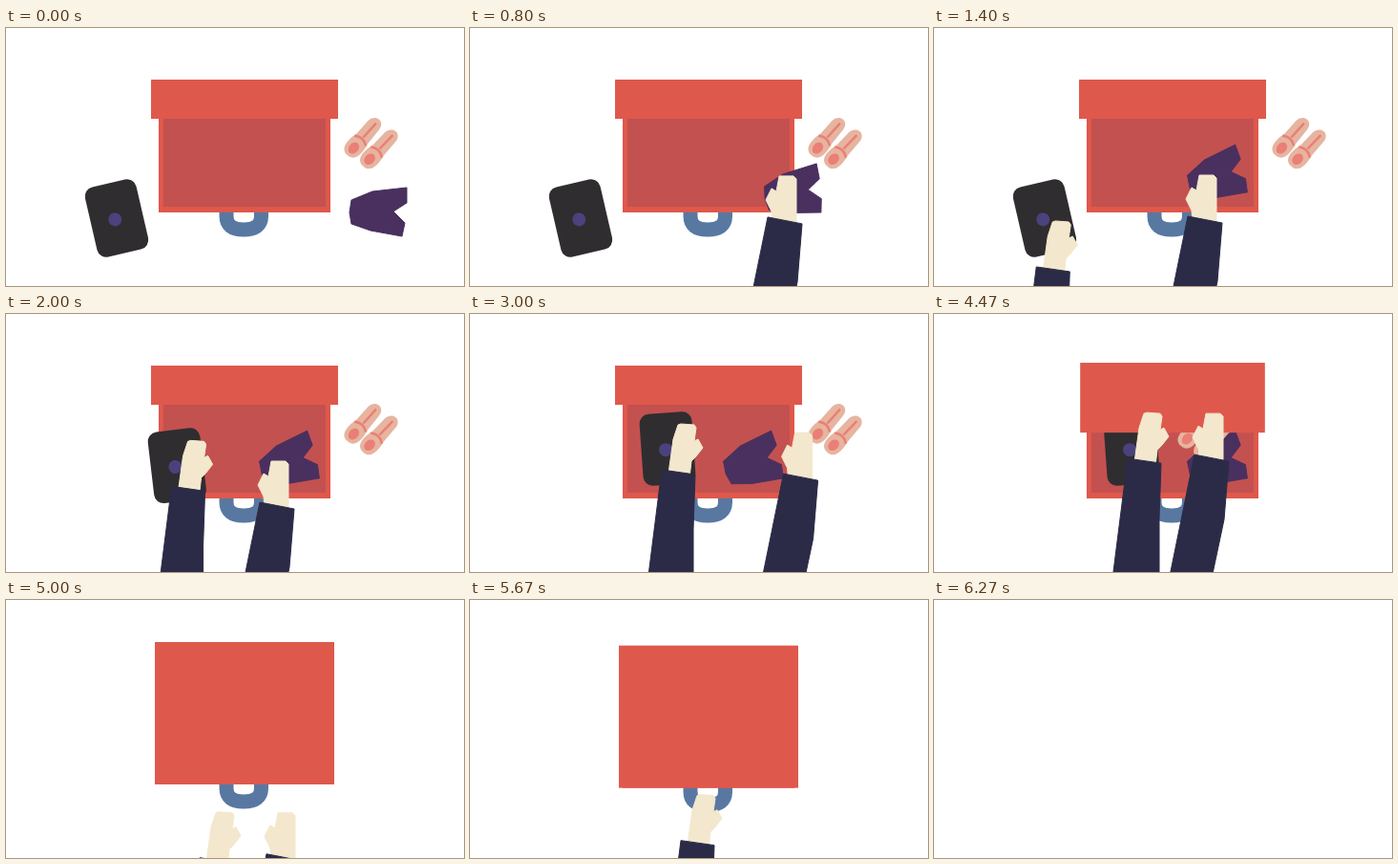
These frames come from a looping animation (480x270 px, 6.54 s). An HTML page with a canvas:

```html
<!DOCTYPE html>
<html lang="en">
<head>
<meta charset="utf-8">
<title>Packing a case</title>
<style>
html, body { margin: 0; width: 100%; height: 100%; overflow: hidden; background: #fff; }
canvas { display: block; }
</style>
</head>
<body>
<canvas id="stage" width="480" height="270"></canvas>
<script>
const ctx = document.getElementById('stage').getContext('2d');
const LOOP = 6540, STEP = 200 / 3;
const RED = '#df584c', SKIN = '#f3e8cd', NAVY = '#2b2b47', PINK = '#e97f76';

// Each key is [time, x, y].
const leftKeys = [
  [1150, 120, 300], [1530, 136, 172], [1600, 136, 172], [2256, 226, 115],
  [3800, 226, 115], [4200, 228, 74], [4216, 228, 74], [4866, 228, 172],
  [5170, 228, 300], [5250, 246, 300], [5560, 246, 200]
];
const rightKeys = [
  [130, 400, 300], [460, 386, 155], [485, 386, 155], [1085, 284, 153],
  [2783, 284, 153], [3133, 372, 111], [3140, 372, 111], [3700, 273, 116],
  [3800, 273, 116], [4200, 291, 74], [4216, 291, 74], [4866, 291, 172],
  [5170, 291, 300]
];

const leftHand = [[-8, 1], [-5, 0], [9, 1], [11, 4], [9, 18], [13, 16], [18, 25], [11, 34], [6, 39], [4, 56], [-18, 52], [-13, 16]];
const leftSleeve = [[-25, 48], [10, 53], [8, 110], [8, 230], [-48, 230]];
const rightHand = [[-6, 1], [9, 1], [12, 4], [12, 54], [-13, 50], [-14, 38], [-20, 26], [-14, 14], [-9, 17]];
const rightSleeve = [[-18, 44], [18, 51], [13, 112], [-12, 230], [-56, 230]];
const garment = [[-28, -12], [-6, -21], [30, -25], [30, -9], [16, 0], [28, 12], [25, 26], [-8, 20], [-28, 13], [-30, 1]];

const mix = (a, b, p) => a + (b - a) * p;

function ease(t, start, end) {
  const p = Math.min(1, Math.max(0, (t - start) / (end - start)));
  return p < 0.5 ? 2 * p * p : 1 - 2 * (1 - p) ** 2;
}

function track(keys, t) {
  let i = 0;
  while (i < keys.length - 2 && t > keys[i + 1][0]) i++;
  const [a, b] = [keys[i], keys[i + 1]];
  const p = ease(t, a[0], b[0]);
  return [mix(a[1], b[1], p), mix(a[2], b[2], p)];
}

function at(x, y, degrees, draw) {
  ctx.save();
  ctx.translate(x, y);
  ctx.rotate(degrees * Math.PI / 180);
  draw();
  ctx.restore();
}

function box(color, x1, y1, x2, y2) {
  ctx.fillStyle = color;
  ctx.fillRect(x1, y1, x2 - x1, y2 - y1);
}

function shape(points, color) {
  ctx.beginPath();
  points.forEach(([x, y]) => ctx.lineTo(x, y));
  ctx.closePath();
  ctx.fillStyle = ctx.strokeStyle = color;
  ctx.lineWidth = 1;
  ctx.lineJoin = 'round';
  ctx.fill();
  ctx.stroke();
}

function oval(color, x, y, rx, ry) {
  ctx.fillStyle = color;
  ctx.beginPath();
  ctx.ellipse(x, y, rx, ry, 0, 0, 7);
  ctx.fill();
}

function line(path, color, width) {
  ctx.strokeStyle = color;
  ctx.lineWidth = width;
  ctx.stroke(new Path2D(path));
}

function arm([x, y], hand, sleeve) {
  at(x, y, 0, () => {
    shape(hand, SKIN);
    shape(sleeve, NAVY);
  });
}

function tablet() {
  ctx.fillStyle = '#2f2d30';
  ctx.beginPath();
  ctx.roundRect(-27.5, -37.5, 55, 75, 10);
  ctx.fill();
  oval('#4b427d', -2, 1, 7, 7);
}

function sandal() {
  ctx.fillStyle = '#e6b49f';
  ctx.fill(new Path2D('M-25 0C-25-12-10-10-2-8L16-8C28-7 28 7 16 7L-2 8C-10 10-25 12-25 0Z'));
  oval(PINK, -15, 0, 6.5, 5);
  line('M-5-8Q1 0-5 8M0 0H20', PINK, 2.5);
}

function draw(t) {
  ctx.fillStyle = '#fff';
  ctx.fillRect(0, 0, 480, 270);

  const packGarment = ease(t, 485, 1085);
  const packTablet = ease(t, 1600, 2256);
  const packShoes = ease(t, 3140, 3700);
  const close = ease(t, 4216, 4866);
  const drop = 214 * (Math.max(0, t - 5606) / 464) ** 2;

  at(0, drop, 0, () => {
    line('M231 188V197Q231 211 249 211Q267.5 211 267.5 197V188', '#5878a2', 15);
    box(RED, 160, 90, 340, 193);
    box('#c35150', 165, 90, 335, 187);

    at(mix(116, 207, packTablet), mix(199, 141, packTablet), mix(-13, -4, packTablet), tablet);
    at(mix(390, 296, packGarment), mix(192, 156, packGarment), -20 * packGarment,
      () => shape(garment, '#49305f'));
    at(-99 * packShoes, 5 * packShoes, 0, () => {
      at(374.5, 114.5, -48, sandal);
      at(391.5, 126.5, -46, sandal);
    });

    box(RED, mix(152, 156, close), mix(54, 44, close), mix(348, 344, close), mix(95, 193, close));
    arm(track(leftKeys, t), leftHand, leftSleeve);
    arm(track(rightKeys, t), rightHand, rightSleeve);
  });
}

const start = performance.now();
function frame() {
  const t = (performance.now() - start) % LOOP;
  draw(Math.floor((t + 4) / STEP) * STEP); // 15 pictures per second
  requestAnimationFrame(frame);
}
frame();
</script>
</body>
</html>
```
